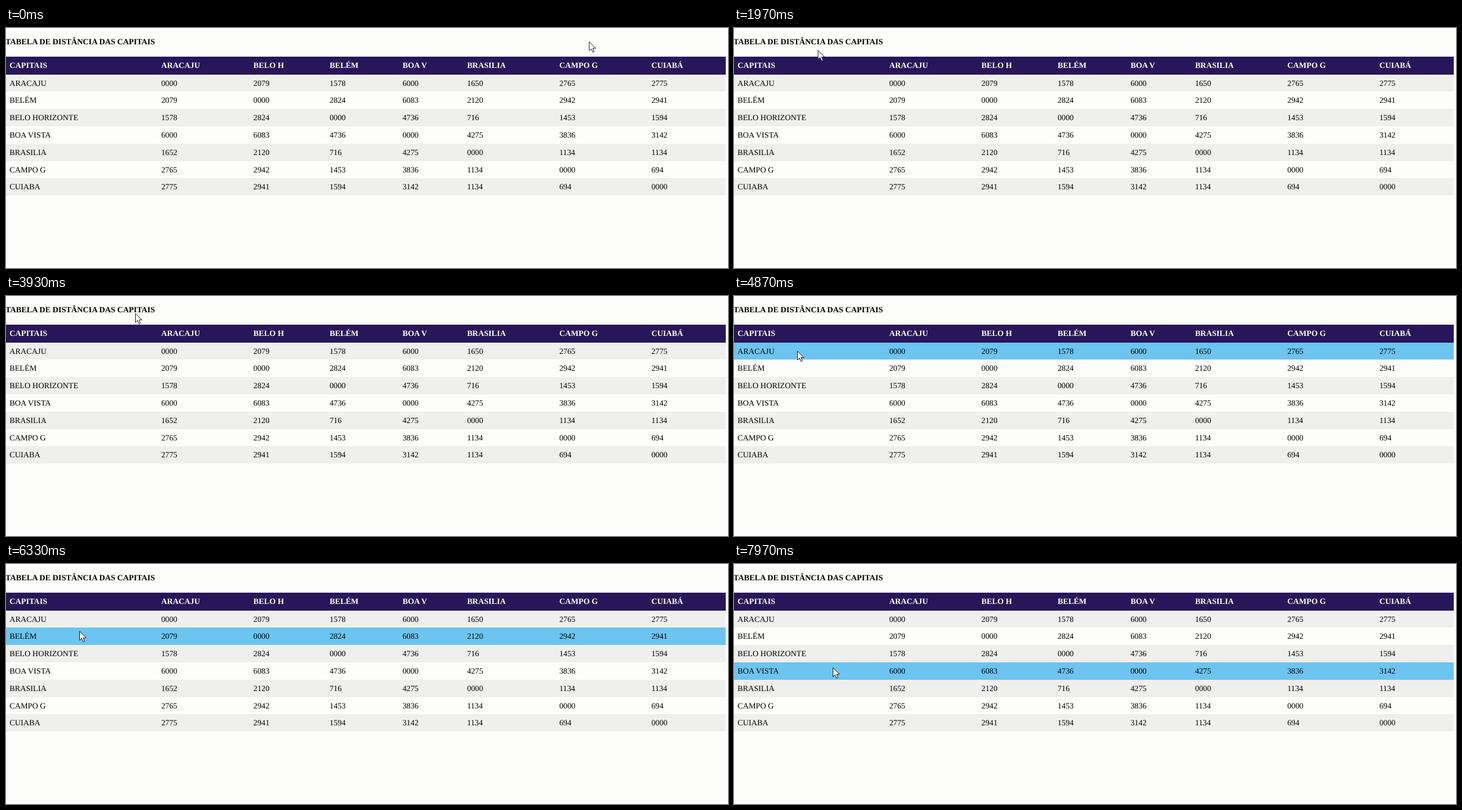
Write an HTML page that moves like this. It is 1280x427 px and loops after 8000 ms.

```html
<!DOCTYPE html>
<html lang="pt">
<head>
<meta charset="utf-8">
<title>Tabela de distância das capitais</title>
<style>
  html, body { margin: 0; width: 100%; height: 100%; overflow: hidden; background: #fdfdfb; }
  svg { display: block; width: 100vw; height: 100vh; }
  rect { shape-rendering: crispEdges; }
  text { font: 14.22px "Liberation Serif", "Times New Roman", serif; fill: #000; text-rendering: geometricPrecision; }
  .bold { font-weight: bold; }
  .head { fill: #fff; }
</style>
</head>
<body>
<svg id="stage" viewBox="0 0 1280 427">
  <rect width="1280" height="427" fill="#fdfdfb"/>
</svg>
<script>
const LOOP = 8000;
const TABLE_WIDTH = 1276, HEAD_TOP = 51, BODY_TOP = 82.6, ROW_HEIGHT = 30.8;
const STRIPE = "#efefee", PLAIN = "#fdfdfc", HOVER = "#6cc4f0";
const COLUMNS = [6.2, 275.2, 438.6, 573.7, 703, 817.4, 981, 1144.2];
const HEADINGS = "CAPITAIS|ARACAJU|BELO H|BELÉM|BOA V|BRASILIA|CAMPO G|CUIABÁ";
const ROWS = [
  "ARACAJU|0000|2079|1578|6000|1650|2765|2775",
  "BELÉM|2079|0000|2824|6083|2120|2942|2941",
  "BELO HORIZONTE|1578|2824|0000|4736|716|1453|1594",
  "BOA VISTA|6000|6083|4736|0000|4275|3836|3142",
  "BRASILIA|1652|2120|716|4275|0000|1134|1134",
  "CAMPO G|2765|2942|1453|3836|1134|0000|694",
  "CUIABA|2775|2941|1594|3142|1134|694|0000"
];

// Pointer stops: time, x, y
const STOPS = [
  [0, 1034, 24.5], [1970, 149, 40], [3930, 229.5, 31], [4870, 112.5, 98],
  [5800, 115.5, 110], [7200, 162, 140], [7970, 175.5, 184.5], [LOOP, 175.5, 184.5]
];

const stage = document.getElementById("stage");

function add(tag, attrs, content = "") {
  const node = document.createElementNS("http://www.w3.org/2000/svg", tag);
  for (const key in attrs) node.setAttribute(key, attrs[key]);
  node.textContent = content;
  return stage.appendChild(node);
}

function addCells(line, y, style) {
  line.split("|").forEach((cell, i) => add("text", { x: COLUMNS[i], y, class: style }, cell));
}

add("text", { x: -0.9, y: 28.5, class: "bold" }, "TABELA DE DISTÂNCIA DAS CAPITAIS");
add("rect", { y: HEAD_TOP, width: TABLE_WIDTH, height: BODY_TOP - HEAD_TOP, fill: "#28165a" });
addCells(HEADINGS, 71, "bold head");

const bands = ROWS.map((line, i) => {
  const y = BODY_TOP + i * ROW_HEIGHT;
  const band = add("rect", { y, width: TABLE_WIDTH, height: ROW_HEIGHT });
  addCells(line, y + 19.9, "");
  return band;
});

const pointer = add("path", {
  d: "M0 0V16L3.7 12.5L6.3 18.7L8.8 17.6L6.3 11.6H11.4Z",
  fill: "#fff", stroke: "#111", "stroke-width": 1, "stroke-linejoin": "round"
});

function pointerAt(time) {
  const next = STOPS.findIndex(stop => stop[0] > time);
  const [t0, x0, y0] = STOPS[next - 1];
  const [t1, x1, y1] = STOPS[next];
  const u = (time - t0) / (t1 - t0);
  const eased = u * u * (3 - 2 * u);
  return [x0 + (x1 - x0) * eased, y0 + (y1 - y0) * eased];
}

function draw(time) {
  const [x, y] = pointerAt(time);
  const hovered = Math.floor((y - BODY_TOP) / ROW_HEIGHT);
  bands.forEach((band, i) => {
    band.setAttribute("fill", i === hovered ? HOVER : i % 2 ? PLAIN : STRIPE);
  });
  pointer.setAttribute("transform", `translate(${x} ${y})`);
}

const start = performance.now();
function tick() {
  draw((performance.now() - start) % LOOP);
  requestAnimationFrame(tick);
}
tick();
</script>
</body>
</html>
```
